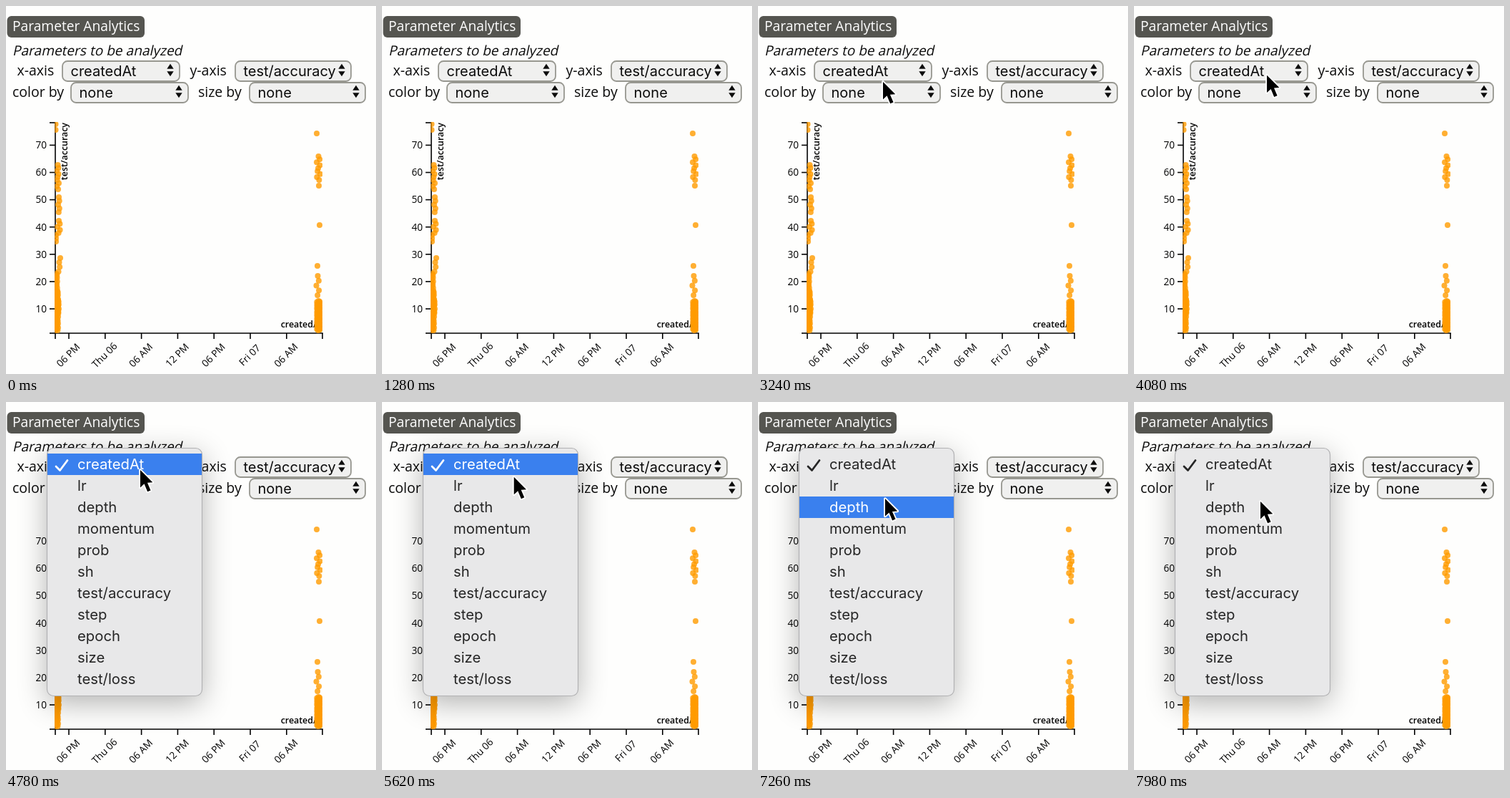
Recreate the animation shown at these times as an HTML page with a canvas. Size 518 by 514 pixels, loop 8000 ms.

```html
<!DOCTYPE html>
<html lang="en">
<head>
<meta charset="utf-8">
<title>Parameter Analytics</title>
<style>
  html, body { margin: 0; width: 100%; height: 100%; overflow: hidden; background: #fefefd; }
  canvas { display: block; width: 518px; height: 514px; }
</style>
</head>
<body>
<canvas id="stage"></canvas>
<script>
const W = 518, H = 514, LOOP = 8000;
const MENU_OPEN = 4400, MENU_BLINK = 7900;
const ROW = 30, MENU_TOP = 72;
const SANS = '"Open Sans", "Noto Sans", sans-serif';
const UI = 'Inter, Roboto, sans-serif';
const INK = '#0c0c0c';

const canvas = document.getElementById('stage');
const dpr = window.devicePixelRatio || 1;
canvas.width = W * dpr;
canvas.height = H * dpr;
const ctx = canvas.getContext('2d');

function text(str, x, y, font, color = INK, align = 'left') {
  ctx.font = font;
  ctx.fillStyle = color;
  ctx.textAlign = align;
  ctx.fillText(str, x, y);
}

function turnedText(str, x, y, angle, font, align) {
  ctx.save();
  ctx.translate(x, y);
  ctx.rotate(angle);
  text(str, 0, 0, font, '#000', align);
  ctx.restore();
}

function box(x, y, w, h, r) {
  ctx.beginPath();
  ctx.roundRect(x, y, w, h, r);
}

function poly(points) {
  ctx.beginPath();
  points.forEach(([x, y]) => ctx.lineTo(x, y));
  ctx.closePath();
}

function line(x1, y1, x2, y2) {
  ctx.beginPath();
  ctx.moveTo(x1, y1);
  ctx.lineTo(x2, y2);
  ctx.stroke();
}

function select(x, y, w, value) {
  box(x, y, w, 28, 7);
  ctx.fillStyle = '#f0f0ef';
  ctx.fill();
  ctx.strokeStyle = '#979790';
  ctx.lineWidth = 1.8;
  ctx.stroke();
  text(value, x + 11.5, y + 21, `20px ${UI}`);
  const cx = x + w - 13;
  for (const dir of [-1, 1]) {
    const base = y + 12.5 + dir * 1.7;
    poly([[cx - 4.7, base], [cx + 4.7, base], [cx, base + dir * 7]]);
    ctx.fill();
  }
}

function form() {
  box(1.5, 14, 192.5, 30, 6);
  ctx.fillStyle = '#555550';
  ctx.fill();
  text('Parameter Analytics', 9, 35, `19.2px ${SANS}`, '#fff');

  // Slanted upright letters.
  ctx.save();
  ctx.transform(1, 0, -0.22, 1, 9, 69);
  text('Parameters to be analyzed', 0, 0, `19.1px ${SANS}`);
  ctx.restore();

  const label = `19.5px ${SANS}`;
  text('x-axis', 15.5, 97, label);
  text('y-axis', 257.5, 97, label);
  text('color by', 9, 127, label);
  text('size by', 269, 127, label);
  select(79, 77, 164, 'createdAt');
  select(321, 77, 162, 'test/accuracy');
  select(91, 107, 164, 'none');
  select(341, 107, 162, 'none');
}

// Each cluster is a column of dots: centre x, top y, height, count, sway.
function cluster(x, y, height = 0, count = 1, sway = 0) {
  return Array.from({ length: count }, (_, i) => [
    x + sway * Math.sin(i * 2.4),
    y + (count > 1 ? height * i / (count - 1) : 0)
  ]);
}

const dots = [
  cluster(69.5, 165, 8, 2),
  cluster(72.5, 222, 34, 9, 1.5),
  cluster(74, 267, 21, 5, 1),
  cluster(74, 300, 17, 5, 2),
  cluster(70, 320, 9, 3),
  cluster(76, 352).concat(cluster(74.5, 358, 13, 3, 1)),
  cluster(70.5, 374, 79, 45, 1.3),
  cluster(72, 398, 55, 30, 1),
  cluster(73, 411, 18, 10, 1),
  cluster(435, 178),
  cluster(437.5, 210, 33, 9, 2.5),
  cluster(438, 251),
  cluster(439, 306),
  cluster(436, 363),
  cluster(436.5, 377, 27, 5, 2),
  cluster(437.5, 412, 41, 60, 2.2)
].flat();

function chart() {
  ctx.strokeStyle = '#000';
  ctx.lineWidth = 1.6;
  line(69, 162.3, 69, 457);
  line(69, 457, 443.8, 457);
  for (const y of [163, 457]) line(61, y, 69, y);
  for (const x of [69, 443]) line(x, 457, x, 465);

  const tick = `500 13.6px ${SANS}`;
  for (let i = 0; i < 7; i++) {
    const y = 423 - 38.1 * i;
    line(61, y, 69, y);
    text(String(10 * (i + 1)), 57, y + 4.8, tick, '#000', 'right');
  }
  const hours = ['06 PM', 'Thu 06', '06 AM', '12 PM', '06 PM', 'Fri 07', '06 AM'];
  hours.forEach((name, i) => {
    const x = 88 + 50.8 * i;
    line(x, 457, x, 465);
    turnedText(name, x + 2.5, 491, -Math.PI / 4, tick, 'center');
  });

  const axis = `600 12.4px ${SANS}`;
  turnedText('test/accuracy', 85.5, 163, -Math.PI / 2, axis, 'right');
  text('createdAt', 443, 448.5, axis, '#000', 'right');

  ctx.save();
  ctx.beginPath();
  ctx.rect(68.3, 162, 374.7, 295);
  ctx.clip();
  ctx.fillStyle = 'rgba(255, 155, 0, .8)';
  for (const [x, y] of dots) {
    ctx.beginPath();
    ctx.arc(x, y, 4, 0, Math.PI * 2);
    ctx.fill();
  }
  ctx.restore();
}

const items = ['createdAt', 'lr', 'depth', 'momentum', 'prob', 'sh',
  'test/accuracy', 'step', 'epoch', 'size', 'test/loss'];

function menu(active) {
  ctx.save();
  ctx.shadowColor = 'rgba(0, 0, 0, .3)';
  ctx.shadowBlur = 40 * dpr;
  ctx.shadowOffsetY = 10 * dpr;
  box(57.5, 64.5, 217, 346, 9);
  ctx.fillStyle = '#e8e8e9';
  ctx.fill();
  ctx.restore();
  ctx.strokeStyle = '#b2b2b4';
  ctx.lineWidth = 1.2;
  ctx.stroke();

  if (active >= 0) {
    ctx.fillStyle = '#3a80ee';
    ctx.fillRect(58, MENU_TOP + ROW * active, 216, ROW);
  }
  const color = i => (i === active ? '#fff' : '#262626');
  items.forEach((name, i) => {
    text(name, 100, MENU_TOP + ROW * i + 22.3, `20.3px ${UI}`, color(i));
  });

  ctx.save();
  ctx.strokeStyle = color(0);
  ctx.lineWidth = 2.8;
  ctx.lineCap = ctx.lineJoin = 'round';
  ctx.beginPath();
  ctx.moveTo(70, 90);
  ctx.lineTo(75.5, 95.5);
  ctx.lineTo(86, 81.5);
  ctx.stroke();
  ctx.restore();
}

// Pointer stops: time, x, y.
const path = [
  [2250, -20, 210], [3150, 174, 103], [3400, 174, 103], [4200, 187, 92],
  [4780, 187, 92], [6320, 181, 110], [7250, 177, 132], [7800, 176, 136]
];

function pointerAt(t) {
  if (t < path[0][0]) return null;
  const next = path.findIndex(p => p[0] > t);
  if (next < 0) return path[path.length - 1].slice(1);
  const [t0, x0, y0] = path[next - 1], [t1, x1, y1] = path[next];
  const k = (t - t0) / (t1 - t0);
  const e = next === 1 ? 1 - (1 - k) ** 2 : k;
  return [x0 + (x1 - x0) * e, y0 + (y1 - y0) * e];
}

function pointer(x, y) {
  ctx.save();
  ctx.translate(x + 1, y + 3);
  ctx.scale(0.92, 0.92);
  poly([[0, 0], [0, 26.5], [6, 21], [11, 33], [15.8, 31], [10.8, 19.4], [18.8, 18.8]]);
  ctx.lineJoin = 'round';
  ctx.lineWidth = 4;
  ctx.strokeStyle = '#fff';
  ctx.stroke();
  ctx.fillStyle = '#000';
  ctx.fill();
  ctx.restore();
}

function draw(t) {
  ctx.setTransform(dpr, 0, 0, dpr, 0, 0);
  ctx.fillStyle = '#fefefd';
  ctx.fillRect(0, 0, W, H);
  form();
  chart();
  const at = pointerAt(t);
  if (t >= MENU_OPEN) {
    menu(t < MENU_BLINK ? Math.floor((at[1] - MENU_TOP) / ROW) : -1);
  }
  if (at) pointer(...at);
}

const start = performance.now();
function tick(now) {
  draw(Math.max(0, now - start) % LOOP);
  requestAnimationFrame(tick);
}
tick(start);
</script>
</body>
</html>
```
